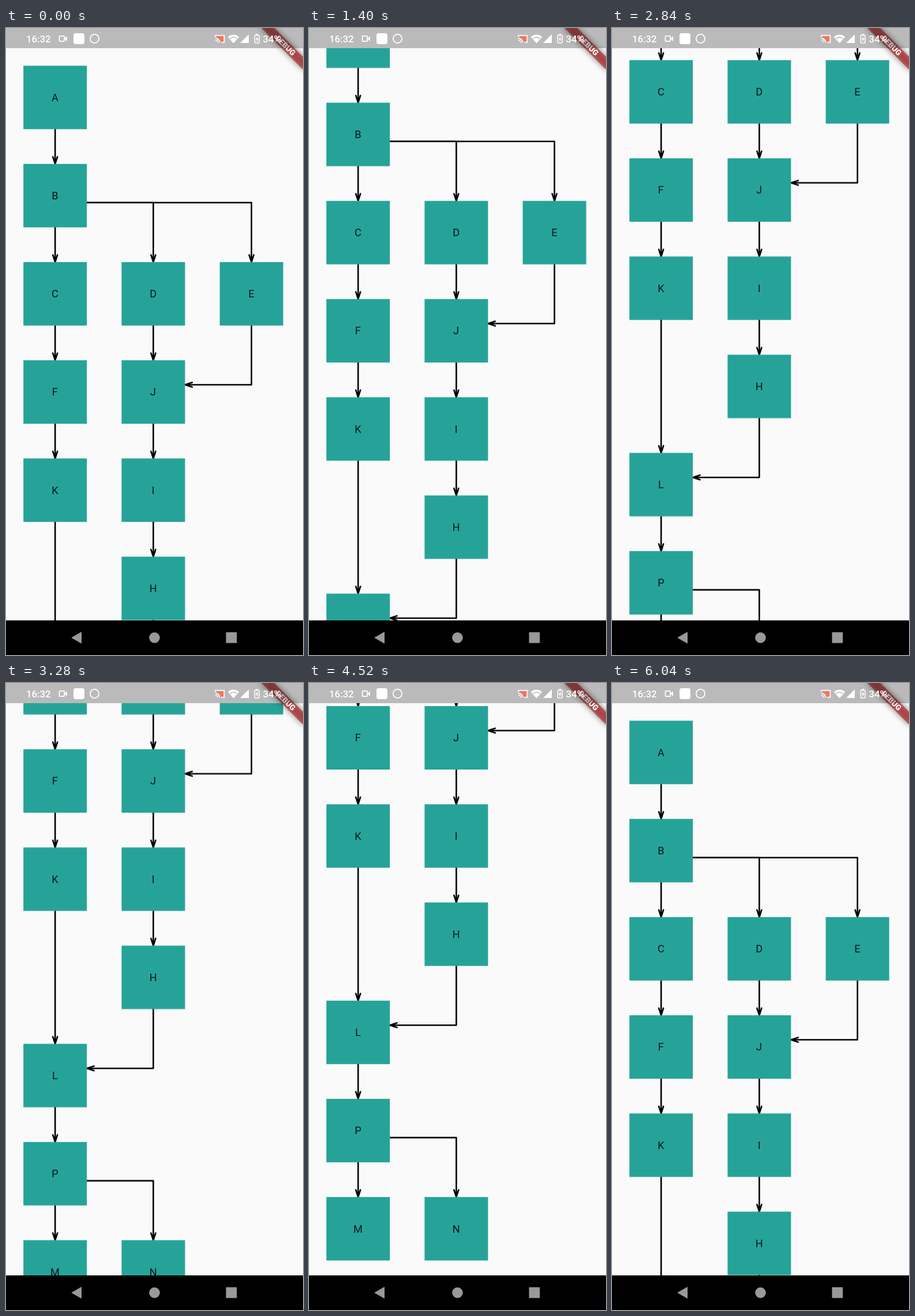
An HTML page that plays this animation: 515 px wide and 1087 px high, repeating every 7760 ms.

```html
<!DOCTYPE html>
<html lang="en">
<head>
<meta charset="utf-8">
<title>Flow graph</title>
<style>
  html, body { margin: 0; width: 100%; height: 100%; overflow: hidden; background: #fafafa; }
  svg { display: block; position: absolute; left: 0; top: 0; }
  #graph { animation: scroll 7760ms linear infinite; }
  .node { fill: #26a399; }
  .edge { fill: none; stroke: #000; stroke-width: 2.6; stroke-linecap: round; stroke-linejoin: round; }
  .label { font: 400 18.2px Roboto, sans-serif; fill: #000; fill-opacity: .87; text-anchor: middle; }
  .status { font: 500 16.8px Roboto, sans-serif; fill: #fff; }
  .banner { font: 900 13.3px Roboto, sans-serif; fill: #fff; text-anchor: middle; }
  @keyframes scroll {
    0%, 10.825% { transform: translateY(0); }
    18.041% { transform: translateY(-106px); }
    27.835% { transform: translateY(-220px); }
    36.598% { transform: translateY(-349.8px); animation-timing-function: cubic-bezier(.3, .4, .65, 1); }
    42.268%, 51.031% { transform: translateY(-461.2px); }
    54.124% { transform: translateY(-462px); animation-timing-function: cubic-bezier(.3, .4, .6, 1); }
    58.247%, 65.464% { transform: translateY(-536px); }
    67.01%, 72.165% { transform: translateY(-540px); }
    72.68% { transform: translateY(-509.8px); animation-timing-function: cubic-bezier(.3, .2, .7, .95); }
    77.835%, 100% { transform: translateY(0); }
  }
</style>
</head>
<body>
<svg width="515" height="1087" viewBox="0 0 515 1087">
  <defs>
    <clipPath id="view"><rect y="35" width="515" height="992"/></clipPath>
    <filter id="soft" x="-50%" y="-150%" width="200%" height="400%"><feGaussianBlur stdDeviation="5.2"/></filter>
  </defs>
  <rect width="515" height="1087" fill="#fafafa"/>
  <g clip-path="url(#view)"><g id="graph"></g></g>

  <g transform="translate(515 0) rotate(45)">
    <rect x="-52.4" y="35.2" width="104.8" height="15.7" fill="#000" fill-opacity=".5" filter="url(#soft)"/>
    <rect x="-52.4" y="35.2" width="104.8" height="15.7" fill="#b71c1c" fill-opacity=".627"/>
    <text class="banner" x="0" y="47.7">DEBUG</text>
  </g>

  <!-- status bar -->
  <rect width="515" height="35" fill="#000" fill-opacity=".255"/>
  <text class="status" x="35" y="25">16:32</text>
  <rect x="92.5" y="13.8" width="8.6" height="9.4" rx="1" fill="none" stroke="#fff" stroke-width="1.7"/>
  <path d="M101.5 18 106 14V23L101.5 19Z" fill="#fff"/>
  <rect x="117" y="9" width="19" height="19" rx="4" fill="#fff"/>
  <circle cx="153.5" cy="18.5" r="7.6" fill="none" stroke="#fff" stroke-width="1.8"/>
  <path d="M365 14.5H377V23.500H372.500Q371 18 365 16.500Z" fill="#ff7052"/>
  <path d="M363 15.500V12.800H378.400V25H373.500M363 18A7.200 7.200 0 0 1 370.200 25.200M363 21.300A3.900 3.900 0 0 1 366.900 25.200" fill="none" stroke="#fff" stroke-width="1.5"/>
  <path d="M384.800 15.500Q394.500 7.500 404.200 15.500L394.500 26.500Z" fill="#fff"/>
  <path d="M388.600 18.300Q394.500 13.800 400.400 18.300" fill="none" stroke="#bababa" stroke-width="1.500"/>
  <path d="M406 26 421 11V26Z" fill="#fff"/>
  <rect x="431.300" y="12.500" width="7.600" height="13.500" rx="1" fill="none" stroke="#fff" stroke-width="1.600"/>
  <path d="M433.300 10.300H437V12.500H433.300ZM435.900 14.500 432.900 19.900H434.700V24.200L437.500 18.600H435.900Z" fill="#fff"/>
  <text class="status" x="445.500" y="25">34%</text>

  <!-- navigation bar -->
  <rect y="1027" width="515" height="60" fill="#000"/>
  <g fill="#999" stroke="#999" stroke-linejoin="round">
    <path d="M114 1057 130.500 1047.500V1066.500Z"/>
    <circle cx="257.500" cy="1057" r="8.800"/>
    <rect x="382" y="1048" width="17.800" height="17.800"/>
  </g>
</svg>
<script>
  const SIZE = 110, PITCH = 170.22, LEFT = 30.2, TOP = 65.4, OUT = 67.2, IN = 42.5;
  const columns = [
    { A: 0, B: 1, C: 2, F: 3, K: 4, L: 6, P: 7, M: 8 },
    { D: 2, J: 3, I: 4, H: 5, N: 8 },
    { E: 2 }
  ];
  const links = 'AB BC BD BE CF DJ EJ FK JI IH KL HL LP PM PN'.split(' ');
  const nodes = {};
  const graph = document.getElementById('graph');

  function add(tag, attrs, text) {
    const el = document.createElementNS('http://www.w3.org/2000/svg', tag);
    for (const key in attrs) el.setAttribute(key, attrs[key]);
    if (text) el.textContent = text;
    graph.appendChild(el);
  }

  columns.forEach((column, i) => {
    for (const id in column) {
      const x = LEFT + i * PITCH, y = TOP + column[id] * PITCH;
      nodes[id] = { x, y, cx: x + SIZE / 2 };
    }
  });

  for (const [from, to] of links) {
    const a = nodes[from], b = nodes[to];
    let d;
    if (b.x < a.x) {
      const x = b.x + SIZE, y = b.y + IN;
      d = `M${a.cx} ${a.y + SIZE}V${y}H${x}m12.4 -4l-12.4 4l12.4 4`;
    } else {
      const start = b.x > a.x ? `M${a.x + SIZE} ${a.y + OUT}H${b.cx}` : `M${a.cx} ${a.y + SIZE}`;
      d = `${start}V${b.y}m-4 -12.4l4 12.4l4 -12.4`;
    }
    add('path', { class: 'edge', d });
  }

  for (const id in nodes) {
    const { x, y, cx } = nodes[id];
    add('rect', { class: 'node', x, y, width: SIZE, height: SIZE });
    add('text', { class: 'label', x: cx - 0.3, y: y + SIZE / 2 + 6.4 }, id);
  }
</script>
</body>
</html>
```
